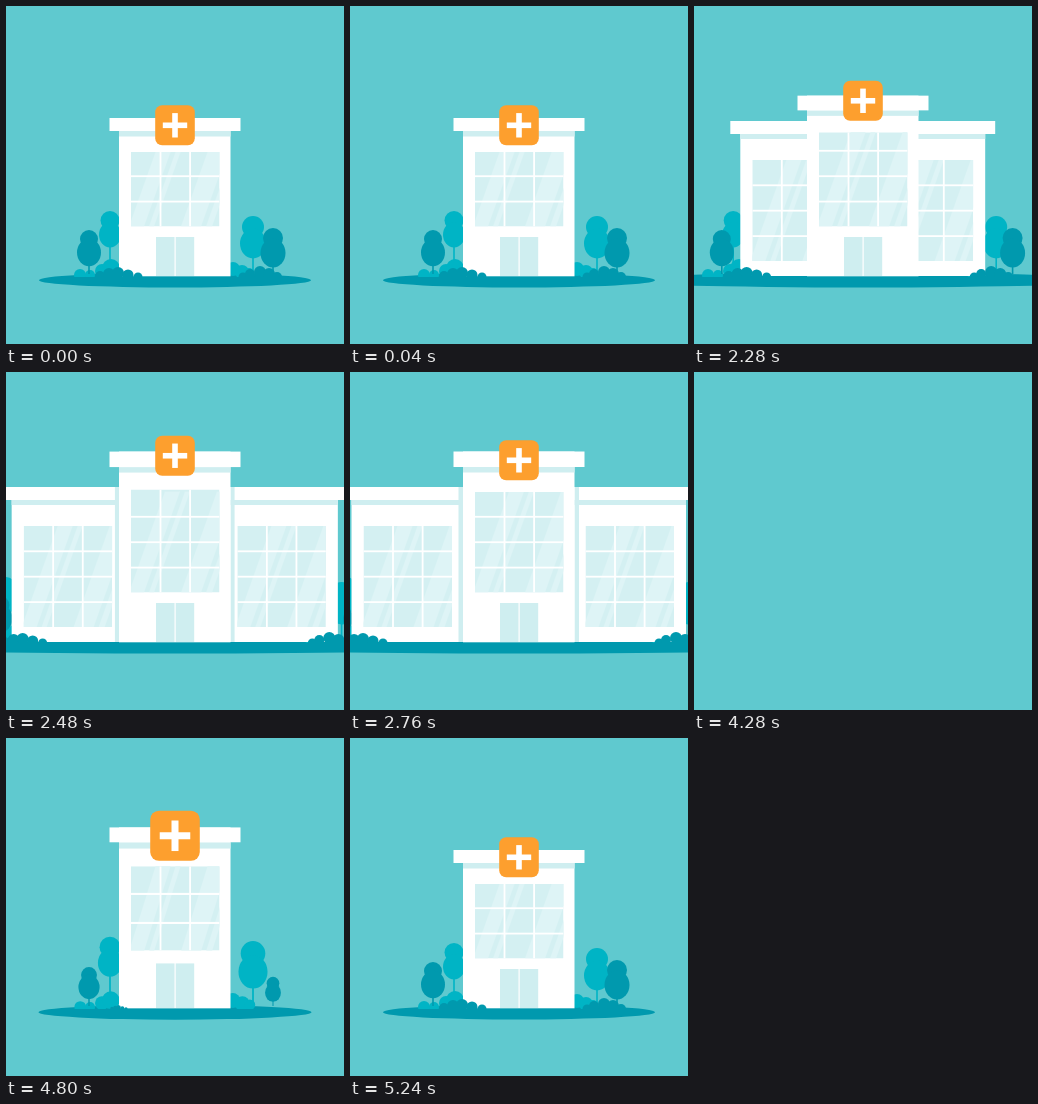
An HTML page with a canvas for the animation above (5680 ms loop, 338 px wide and 338 px high).

```html
<!DOCTYPE html>
<html lang="en">
<head>
<meta charset="utf-8">
<title>Growing hospital</title>
<style>
html, body { margin: 0; height: 100%; overflow: hidden; background: #5fc9cf; }
canvas { display: block; width: 100vw; height: 100vh; }
</style>
</head>
<body>
<canvas id="stage" width="338" height="338"></canvas>
<script>
const ctx = document.getElementById('stage').getContext('2d');
const LOOP = 5680, GROW = 1920, RESET = 4280, BASE = 270;
const SKY = '#5fc9cf', DARK = '#0099ae', LIGHT = '#00b4c5', WHITE = '#fff',
  SHADE = '#cfeef0', GLASS = '#d4f0f2', GLINT = '#def4f6', ORANGE = '#fd9f2e';

const clamp = v => Math.min(1, Math.max(0, v));
const ease = (t, a, b) => (1 - Math.cos(Math.PI * clamp((t - a) / (b - a)))) / 2;
// Rises to `peak` at b, then settles to 1 at c.
const pop = (t, a, b, c, peak) => t < b ? peak * ease(t, a, b) : peak + (1 - peak) * ease(t, b, c);
const mix = (a, b, p) => a + (b - a) * p;

function rect(color, x, y, w, h) {
  ctx.fillStyle = color;
  ctx.fillRect(x, y, w, h);
}

function oval(x, y, rx, ry = rx) {
  ctx.beginPath();
  ctx.ellipse(x, y, Math.max(0, rx), Math.max(0, ry), 0, 0, 7);
  ctx.fill();
}

function scaled(x, y, s, draw) {
  if (s <= 0) return;
  ctx.save();
  ctx.translate(x, y);
  ctx.scale(s, s);
  draw();
  ctx.restore();
}

// Pear-shaped crown: narrow circle over a wider one.
function tree(color, x, s, height, top, wide) {
  scaled(x, 268, s, () => {
    rect(color, -0.8, -height / 2, 1.6, height / 2);
    oval(0, top - height, top);
    oval(0, top * 2.5 - height, wide, wide * 1.15);
  });
}

function bush(color, x, s, blobs) {
  scaled(x, 271, s, () => {
    ctx.beginPath();
    ctx.rect(-40, -40, 80, 40);
    ctx.clip();
    ctx.fillStyle = color;
    for (const [dx, dy, r] of blobs) oval(dx, dy, r);
  });
}

// Panes on a fixed grid measured from the bottom edge, cropped to [top, top + height].
function panes(x, top, height, bottom) {
  if (height <= 0) return;
  ctx.save();
  ctx.beginPath();
  ctx.rect(x, top, 88.5, height);
  ctx.clip();
  rect(GLASS, x, top, 88.5, height);
  ctx.fillStyle = GLINT;
  for (const [left, width] of [[34, 15], [54, 5], [86, 20], [111, 6]]) {
    ctx.beginPath();
    ctx.moveTo(x + left, bottom - 101);
    ctx.lineTo(x + left + width, bottom - 101);
    ctx.lineTo(x + left + width - 36, bottom);
    ctx.lineTo(x + left - 36, bottom);
    ctx.fill();
  }
  for (const dx of [28.6, 58.2]) rect(WHITE, x + dx, top, 1.8, height);
  for (let i = 1; i < 4; i++) rect(WHITE, x, bottom - 25.4 * i - 0.4, 88.5, 1.8);
  ctx.restore();
}

function wings(w) {
  if (w <= 0) return;
  const slide = 112 * (1 - w), shadow = 4.5 * clamp((w - 0.6) / 0.4);
  for (const right of [false, true]) {
    const at = (x, width) => right ? 337.5 - x - width : x;
    const box = (color, x, y, end, h) => rect(color, at(x, end - x), y, end - x, h);
    box(WHITE, 1.5 + slide, 128, 114, BASE - 128);
    box(SHADE, 1.5 + slide, 128, 114, 5);
    box(WHITE, -8.5 + slide, 115, 114, 13);
    panes(at(13.5 + slide, 88.5), 154, 101, 255);
    box(SHADE, 113 - shadow, 115, 113, BASE - 115);
  }
}

function tower(t, intro, lift) {
  const height = pop(intro, 4440, 4820, 5080, 1.15);
  if (height <= 0) return;
  const roof = mix(112, 79.5, lift), thick = 13 + 2.5 * lift;
  const winTop = mix(146, 120, pop(t, GROW, 2500, 2760, 1.1));
  const reveal = ease(intro, 4520, 4820);
  const door = 39 * ease(intro, 4440, 4760);
  ctx.save();
  ctx.translate(0, BASE);
  ctx.scale(1, height);
  ctx.translate(0, -BASE);
  rect(WHITE, 113, roof, 111.5, BASE - roof + 0.3);
  rect(SHADE, 113, roof + thick, 111.5, 5.5);
  rect(WHITE, 103.5, roof, 131, thick);
  panes(125, winTop, (220.5 - winTop) * reveal, 220.5);
  rect(SHADE, 150, BASE - door, 18.5, door);
  rect(SHADE, 169.7, BASE - door, 18.5, door);
  ctx.restore();

  const signY = mix(119.3, 88.3, pop(t, GROW, 2500, 2760, 1.15));
  scaled(169, BASE - (BASE - signY) * height, pop(intro, 4620, 4820, 5080, 1.28), () => {
    ctx.fillStyle = ORANGE;
    ctx.beginPath();
    ctx.roundRect(-19.8, -20, 39.6, 40, 7);
    ctx.fill();
    rect(WHITE, -12.2, -2.8, 24.4, 5.6);
    rect(WHITE, -2.8, -12.2, 5.6, 24.4);
  });
}

function draw(now) {
  const clock = now % LOOP, rebuilding = clock >= RESET;
  const t = rebuilding ? 0 : clock;
  const intro = rebuilding ? clock : LOOP;
  const spread = ease(t, GROW, 2560);
  const lift = ease(t, GROW, 2500);
  const sprout = start => pop(intro, start, start + 260, start + 480, 1.12);

  rect(SKY, 0, 0, 338, 338);
  const ground = pop(intro, RESET, 4540, 4840, 1.1);
  ctx.fillStyle = DARK;
  oval(169, 274.2, mix(136, 310, ease(t, GROW, 2520)) * ground, 7.4 * ground);

  tree(LIGHT, 104 - 108 * spread, sprout(4480), 63, 9.5, 11);
  tree(LIGHT, 247 + 92 * spread, sprout(4530), 58, 11, 13);
  bush(LIGHT, 90 - 100 * spread, sprout(4600), [[-16, -2, 6], [-6, -2, 5], [6, -6, 7], [15, -9, 9]]);
  bush(LIGHT, 230 + 72 * spread, sprout(4440), [[-3, -8, 7], [6, -5, 7], [13, -4, 5]]);
  tree(DARK, 83 - 92 * spread, sprout(4620), 44, 9, 12);
  tree(DARK, 267 + 86 * spread, sprout(4660), 46, 10, 12.5);

  wings(spread);
  tower(t, intro, lift);

  bush(DARK, 113 - 99 * spread, sprout(4700), [[-19, -1, 5], [-10, -3, 6], [-1, -4, 6], [9, -2, 5.5], [19, 0, 4.5]]);
  bush(DARK, 252 + 72 * spread, sprout(4740), [[-15, 0, 4.5], [-8, -3, 5], [2, -5, 6], [11, -3, 6], [19, 0, 5]]);
}

function tick() {
  draw(performance.now());
  requestAnimationFrame(tick);
}
tick();
</script>
</body>
</html>
```
